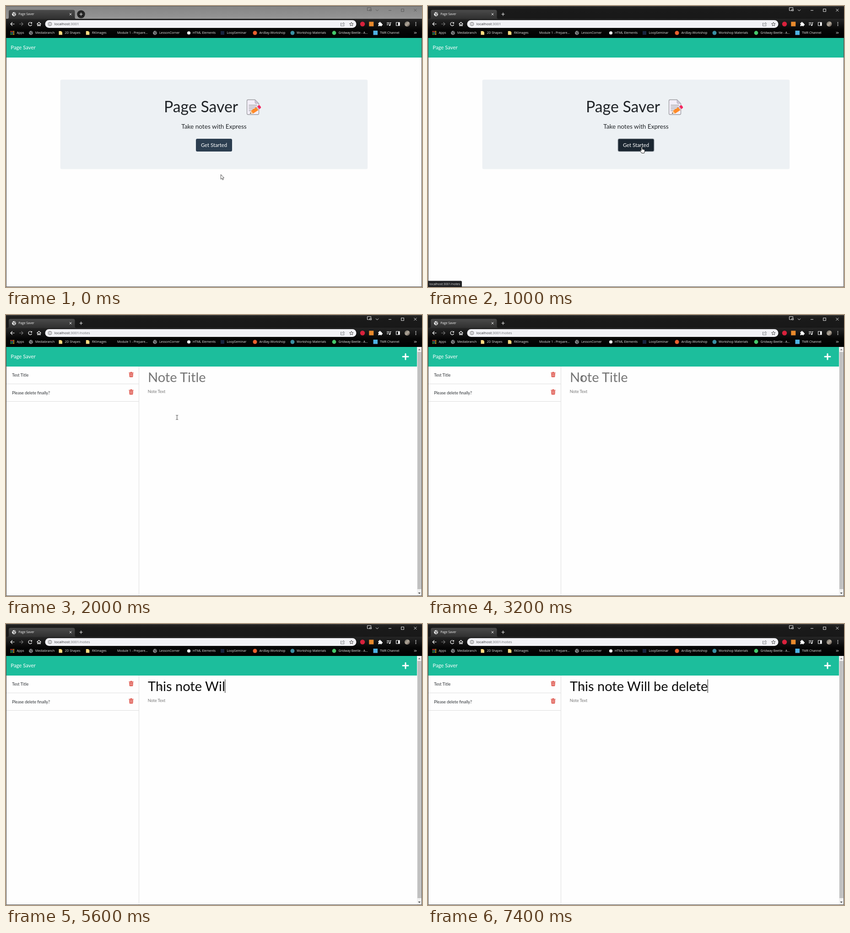
Animation, 909 px wide and 616 px high, one loop 8 s. Source, as an HTML page:

```html
<!DOCTYPE html>
<html lang="en">
<head>
<meta charset="utf-8">
<title>Page Saver</title>
<style>
html, body { margin: 0; width: 100%; height: 100%; overflow: hidden; background: #fefefe; }
svg { display: block; }
text { white-space: pre; }
.ui { font-family: "Open Sans", "Noto Sans", sans-serif; }
.web { font-family: Lato, sans-serif; }
.line { fill: none; stroke: #fff; stroke-width: 1.2; }
</style>
</head>
<body>
<svg id="stage" width="909" height="616" viewBox="0 0 909 616" xmlns="http://www.w3.org/2000/svg">
<defs>
  <linearGradient id="tabFill" x2="0" y2="1"><stop stop-color="#4a4a4a"/><stop offset="1" stop-color="#303030"/></linearGradient>
  <linearGradient id="barFill" x2="0" y2="1"><stop stop-color="#252525"/><stop offset=".55" stop-color="#070707"/><stop offset="1"/></linearGradient>
  <linearGradient id="activeFill" x2="0" y2="1"><stop stop-color="#252525"/><stop offset=".3" stop-color="#1a1a1a"/><stop offset="1" stop-color="#181818"/></linearGradient>
  <linearGradient id="idleFill" x2="0" y2="1"><stop stop-color="#858585"/><stop offset="1" stop-color="#969696"/></linearGradient>
  <linearGradient id="photo" x2="1" y2="1"><stop stop-color="#5b5a52"/><stop offset=".5" stop-color="#b3a99c"/><stop offset="1" stop-color="#4b4038"/></linearGradient>
</defs>
<g id="home"></g>
<g id="notes"></g>
<g id="chrome"></g>
<g id="status"></g>
<g id="pointer"></g>
</svg>
<script>
const $ = id => document.getElementById(id);
const rect = (x, y, w, h, fill, more = '') =>
  `<rect x="${x}" y="${y}" width="${w}" height="${h}" fill="${fill}" ${more}/>`;
const dot = (x, y, r, fill, more = '') => `<circle cx="${x}" cy="${y}" r="${r}" fill="${fill}" ${more}/>`;
const path = (d, more = 'class="line"') => `<path d="${d}" ${more}/>`;
const text = (s, x, y, size, fill, cls = 'web', more = '') =>
  `<text class="${cls}" x="${x}" y="${y}" font-size="${size}" fill="${fill}" ${more}>${s}</text>`;
const stroke = (color, width = 1) => `fill="none" stroke="${color}" stroke-width="${width}"`;
const show = (id, on) => $(id).setAttribute('display', on ? 'inline' : 'none');

const APP = 'Page Saver';
const TEAL = '#1cbe9c';

const globe = (x, y, color) => dot(x, y, 4.4, color) +
  path(`M${x - 3} ${y - 2}l2.4 1.2l1 2l-1.8 1.4M${x + 1} ${y - 3.6}l.4 2l2.4 .8M${x + 1} ${y + 3}l1.2 -2.2`, stroke('#333', 1.1));

const folder = x => path(`M${x} 55h5l2.5 2.5v5.7h-7.5z`, 'fill="#fbdc83"') +
  path(`M${x + 5} 55v2.5h2.5`, 'fill="#d5a93e"');

function appsGrid() {
  const colors = ['#e8453c', '#e8453c', '#f0b429', '#35a853', '#4285f4', '#f0b429', '#35a853', '#35a853', '#f0b429'];
  return colors.map((c, i) => rect(9.6 + i % 3 * 3.1, 54.8 + Math.floor(i / 3) * 3.1, 2.2, 2.2, c)).join('');
}

function bookmarks() {
  const labels = [
    ['Apps', 23.5], ['Mediabranch', 64], ['2D Shapes', 128.5], ['RKImages', 188],
    ['Module 1 - Prepare...', 243], ['LessonCorner', 335], ['HTML Elements', 408],
    ['LoopSeminar', 482.5], ['ArcBay-Workshop', 553.5], ['Workshop Materials', 635],
    ['Gridway Beetle - A...', 726.5], ['TMR Channel', 817]
  ];
  return labels.map(([s, x]) => text(s, x, 61.2, 6.9, '#e4e4e4', 'ui')).join('') +
    appsGrid() + globe(54.5, 59, '#8c8f92') + globe(325.5, 59, '#8c8f92') + folder(115.5) + folder(174.8) +
    dot(399.5, 59, 3.6, '#fff') + rect(469, 55, 8, 8, '#18243f') + dot(544, 59, 4.5, '#e9602f') +
    dot(626, 59, 4.5, '#3b8fa3') + dot(717, 59, 4.4, '#45c76a') + rect(802.5, 54, 9.5, 9.5, '#4fb1e2') +
    path('M892 56.8l2 2l-2 2M894.8 56.8l2 2l-2 2', stroke('#fff'));
}

function toolbar() {
  return path('M18.5 39.5h-8M14 35.7l-3.8 3.8l3.8 3.8') +
    path('M29 39.5h8M33.4 35.7l3.8 3.8l-3.8 3.8', stroke('#777', 1.2)) +
    path('M55.8 37.2a3.8 3.8 0 1 0 .6 3.6') + path('M57 35v3.6h-3.6z', 'fill="#fff"') +
    path('M67.5 39.8l4.5 -4.3l4.5 4.3M69 39v4.5h2v-2.7h2v2.7h2v-4.5') +
    rect(85.5, 31, 680, 17, '#f2f2f6', 'rx="8.5"') +
    dot(96, 39.5, 3.8, 'none', 'stroke="#555" stroke-width=".9"') +
    path('M96 38.8v2.8M96 37v1', stroke('#555', .9)) +
    `<text class="ui" x="105.7" y="42.4" font-size="8"><tspan fill="#303134">localhost</tspan><tspan fill="#6a6d71">:3001</tspan><tspan id="route" fill="#6a6d71"></tspan></text>` +
    path('M733.5 37.5h-2v6.2h7.4v-2M733.8 41c.2 -2.3 1.5 -3.2 3.5 -3.2v-1.7l2.6 2.6l-2.6 2.5v-1.7', stroke('#5f6368', .8)) +
    path('M754.8 35.6l1.2 2.8l3 .2l-2.3 2l.7 3l-2.6 -1.6l-2.6 1.6l.7 -3l-2.3 -2l3 -.2z', stroke('#444', .9)) +
    dot(779, 39.5, 5.2, '#d8213c') + rect(793.3, 34.5, 10, 10, '#e98a2c') +
    path('M813.5 37h2.2a1.5 1.5 0 1 1 2.8 0h2.4v2.5a1.5 1.5 0 1 1 0 2.8v1.9h-2.4a1.5 1.5 0 0 0 -2.8 0h-2.2v-2.3a1.5 1.5 0 0 0 0 -2.8z', 'fill="#fff"') +
    path('M832 36.5h6M832 39h6M832 41.5h3.5M839.8 42v-5.5h2') + dot(838.4, 42, 1.6, '#fff') +
    rect(852.5, 36, 7.6, 7, 'none', 'stroke="#fff"') + rect(857, 36, 3, 7, '#fff') +
    dot(876.7, 39.5, 5.8, 'url(#photo)') +
    [36.3, 39.5, 42.7].map(y => dot(895.5, y, .95, '#fff')).join('');
}

function buildChrome() {
  $('chrome').innerHTML =
    rect(0, 0, 909, 29, 'url(#activeFill)', 'id="titlebar"') +
    rect(0, 28, 909, 42, 'url(#barFill)') +
    path('M2 28.5q4 0 4 -4v-12q0 -4 4 -4h136.500q4 0 4 4v12q0 4 4 4z', 'fill="url(#tabFill)"') +
    globe(17.5, 18, '#f2f2f2') + text(APP, 27.3, 20.4, 6.75, '#f4f4f4', 'ui') +
    path('M138.700 15.700l4.600 4.600M143.300 15.700l-4.600 4.600', stroke('#eee', 1)) +
    dot(164, 18, 8.7, '#242424', 'id="newTab"') + path('M160.500 18h7M164 14.500v7', stroke('#eee', 1.1)) +
    `<g id="controls" fill="none" stroke="#fff" stroke-width=".9">
      <path d="M796.500 10h-7v-6.500h8v3M795 7.500h3.500v3h-3.500zM808 7.800l3 3l3 -3M836 9.700h6M891.500 6.300l5.800 5.800M897.300 6.300l-5.800 5.800"/>
      <rect x="863.700" y="6.500" width="5.600" height="5.600"/></g>` +
    toolbar() + bookmarks() +
    path('M.5 70v545.5h908v-545.5', stroke('#4b4b4b')) + path('M0 .5h909', stroke('#555', .8));
}

function buildHome() {
  const page = path('M526.500 208q0 -2.500 2.500 -2.500h15l8.500 8.500v21.500q0 2.500 -2.500 2.500h-21q-2.500 0 -2.500 -2.500z',
      'fill="#f3eef8" stroke="#9b9b9f" stroke-width="1.300"') +
    path('M544 205.500v6q0 2.500 2.500 2.500h6z', 'fill="#cdc4d6" stroke="#a09aa8" stroke-width=".600"') +
    path('M530.500 217.500h18M530.500 221.500h17M530.500 225.500h12M530.500 229.500h8', stroke('#9b9b9f', 1.5));
  const pencil = path('M533 236l2.500 -6.500l13 -9l4.800 6.500l-13.300 8.800z', 'fill="#ff8a28"') +
    path('M533 236l2.500 -6.500l4.500 6.300z', 'fill="#f7d3a5"') + path('M533 236l1 -2.600l1.800 2.400z', 'fill="#333"') +
    path('M546.500 221.800l2.800 -2l4.800 6.600l-2.800 1.900z', 'fill="#cfc6d6"') +
    path('M549 220l3 -2.200q1.700 -1 3 .7l1.800 2.500q1.200 1.800 -.5 3l-2.900 2z', 'fill="#f5275f"');
  $('home').innerHTML = rect(0, 70, 909, 546, '#fefefe') + rect(0, 70, 909, 43, TEAL) +
    text(APP, 10.3, 95.3, 11.33, '#fff') +
    rect(118.700, 161.500, 671.500, 196, '#edf1f4', 'rx="3"') +
    text(APP, 345, 233.300, 33.85, '#212529') + page + pencil +
    text('Take notes with Express', 454.500, 268.500, 13.6, '#212529', 'web', 'text-anchor="middle"') +
    rect(415, 291, 79, 28, '#2c3e50', 'id="button" rx="3"') +
    text('Get Started', 454.500, 309, 11.33, '#fff', 'web', 'text-anchor="middle"');
}

const trash = y => `<g transform="translate(268.500 ${y})">` +
  path('M0 1.300h3l.7 -1.300h2.600l.7 1.300h3v1.400h-10zM.7 3.400h8.600l-.5 7q-.1 1 -1.100 1h-5.400q-1 0 -1.100 -1z', 'fill="#dc4a40"') +
  path('M3 4.700v5.200M5 4.700v5.200M7 4.700v5.200', stroke('#fefefe', .7)) + '</g>';

function buildNotes() {
  const rule = y => path(`M1 ${y}h289.500`, stroke('#dedede'));
  $('notes').innerHTML = rect(0, 70, 909, 546, '#fefefe') + rect(0, 70, 898, 43, TEAL) +
    text(APP, 10.3, 95.3, 11.33, '#fff') +
    path('M873 85.200v12M867 91.200h12', 'stroke="#fff" stroke-width="3" stroke-linecap="round"') +
    path('M290.500 113v502', stroke('#dedede')) +
    `<g id="list">${text('Test Title', 13.300, 135.300, 9.07, '#2b2f33')}${trash(124.800)}${rule(151)}` +
    `${text('Please delete finally?', 13.300, 173.500, 9.07, '#2b2f33')}${trash(163)}${rule(189.500)}</g>` +
    text('', 310, 146.500, 29, '#757575', 'web', 'id="title"') +
    text('Note Text', 309.700, 170.600, 9.07, '#757575') +
    rect(310, 121.500, 1, 29.500, '#111', 'id="caret"') +
    rect(898, 70, 10, 545, '#f1f1f1') + rect(899, 81, 8.500, 520, '#c1c1c1') +
    path('M900.500 77.300l2.700 -3l2.700 3z', 'fill="#777"') + path('M900.500 608.500l2.700 3l2.700 -3z', 'fill="#444"');
}

function buildOverlays() {
  $('status').innerHTML = path('M0 602.500h71.500q2.500 0 2.500 2.500v11h-74z', 'fill="#1f2023"') +
    text('localhost:3001/notes', 3, 611.700, 6.9, '#dcdcdc', 'ui');
  $('pointer').innerHTML =
    path('M0 0v10.200l2.300 -2.100l1.600 3.600l1.700 -.8l-1.600 -3.500h3.100z', 'id="arrow" fill="#fff" stroke="#222" stroke-width=".8"') +
    path('M-1.200 1q0 -1.200 1.100 -1.200t1.100 1.200v4l1.500 .2l1.600 .4l1.300 .5q.8 .4 .8 1.400v2.500l-1.200 3.500h-5.300l-2.800 -4.300q-1 -1.400 0 -2q.8 -.4 1.900 .9z', 'id="hand" fill="#fff" stroke="#111" stroke-width=".9"') +
    path('M-2.500 -4.700h1.700q.8 0 .8 .8v7.800q0 .8 -.8 .8h-1.700M2.500 -4.700h-1.700q-.8 0 -.8 .8M2.500 4.700h-1.700q-.8 0 -.8 -.8', 'id="beam" fill="none" stroke="#333" stroke-width=".9"');
}

const PHRASE = 'This note Will be delete';
// [time, letters typed]
const KEYS = [[3400, 1], [3600, 2], [3800, 3], [4000, 4], [4200, 6], [4400, 8], [4600, 9], [5200, 10],
  [5400, 11], [5600, 13], [5800, 14], [6000, 15], [6200, 16], [6400, 17], [6600, 18], [6800, 19],
  [7000, 21], [7200, 23], [7400, 24]];
// [time, x, y]
const TRACK = [[0, 469.5, 369.5], [200, 469.5, 369.5], [800, 467.3, 309], [1200, 467.3, 309],
  [2000, 373.7, 224.5], [2400, 338, 141], [2600, 336.8, 138.5]];

function locate(t) {
  const next = TRACK.findIndex(p => p[0] > t);
  if (next < 0) return TRACK[TRACK.length - 1].slice(1);
  const [a, b] = [TRACK[next - 1], TRACK[next]];
  const u = (t - a[0]) / (b[0] - a[0]);
  const k = u * u * (3 - 2 * u);
  return [a[1] + (b[1] - a[1]) * k, a[2] + (b[2] - a[2]) * k];
}

function draw(ms) {
  const t = Math.floor(ms / 200) * 200;
  const idle = t < 200, onNotes = t >= 1200;
  $('titlebar').setAttribute('fill', idle ? 'url(#idleFill)' : 'url(#activeFill)');
  $('controls').setAttribute('stroke', idle ? '#555' : '#fff');
  show('newTab', idle);
  show('home', !onNotes);
  show('notes', onNotes);
  show('list', t >= 1400);
  show('status', t >= 800 && t < 1400);
  $('route').textContent = onNotes ? '/notes' : '';

  const button = $('button');
  button.setAttribute('fill', t >= 1000 ? '#1b2631' : t >= 800 ? '#1e2b37' : '#2c3e50');
  button.setAttribute('stroke', t >= 1000 ? '#a5abb2' : 'none');
  button.setAttribute('stroke-width', 1.2);

  const typed = KEYS.reduce((n, [at, count]) => t >= at ? count : n, 0);
  const title = $('title');
  title.textContent = typed ? PHRASE.slice(0, typed) : 'Note Title';
  title.setAttribute('fill', typed ? '#0c0c0c' : '#757575');
  show('caret', typed > 0 || (t >= 2600 && t < 3000));
  $('caret').setAttribute('x', typed ? 309.5 + title.getComputedTextLength() : 310);

  const [x, y] = locate(t);
  $('pointer').setAttribute('transform', `translate(${x} ${y})`);
  show('arrow', t < 800);
  show('hand', t >= 800 && t < 1400);
  show('beam', t >= 1400);
}

buildChrome();
buildHome();
buildNotes();
buildOverlays();
const start = performance.now();
function tick() {
  draw((performance.now() - start) % 8000);
  requestAnimationFrame(tick);
}
tick();
</script>
</body>
</html>
```
